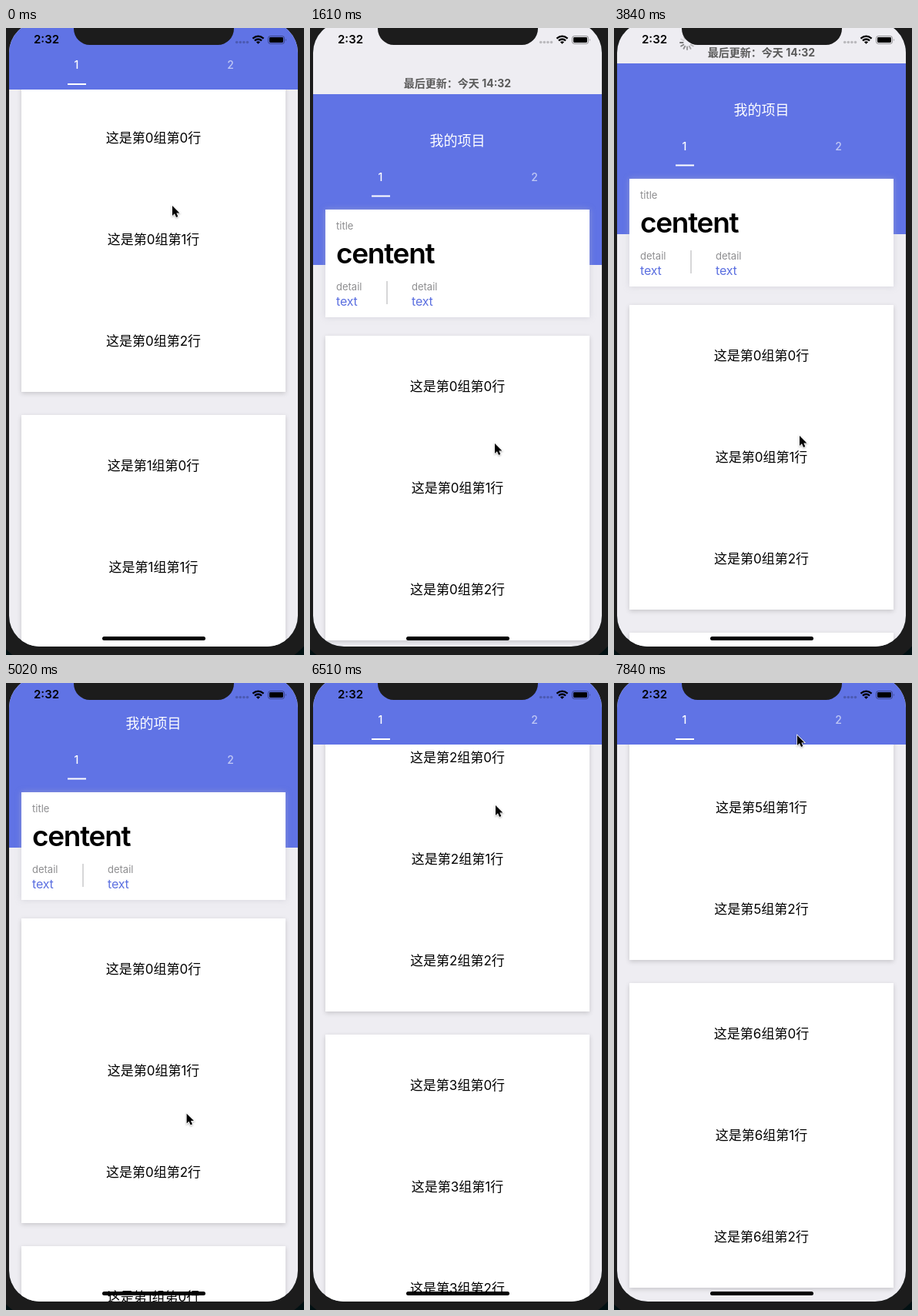
Recreate the animation shown at these times as an HTML page. Size 387x815 px, loop 7990 ms.

```html
<!DOCTYPE html>
<html lang="zh">
<head>
<meta charset="utf-8">
<title>Pull to refresh</title>
<style>
  html, body { margin: 0; width: 100%; height: 100%; overflow: hidden; background: #021113; }
  body { position: relative; font-family: Inter, "Noto Sans CJK SC", "Noto Sans CJK", sans-serif; }
  div, svg { position: absolute; }
  div { white-space: nowrap; }
  #screen {
    left: 4px; top: -8px; width: 375px; height: 812px; overflow: hidden;
    border-radius: 40px; background: #eeedf2;
  }
  #bezel {
    left: 4px; top: -8px; width: 375px; height: 812px;
    border-radius: 40px; box-shadow: 0 0 0 22px #1c1c1c;
  }
  #content { left: 0; top: 0; width: 375px; }
  .center { left: 0; width: 375px; text-align: center; }
  .hero { left: 0; top: 0; width: 375px; height: 222px; background: #6073e5; }
  .heading { top: 46px; line-height: 30px; font-size: 18px; color: #fff; }
  .updated { top: -29px; line-height: 30px; font-size: 14px; font-weight: 700; color: #5a5a5a; }
  .card {
    left: 16px; width: 343px; background: #fff;
    box-shadow: 0 2px 6px rgba(0, 0, 0, .17);
  }
  .summary { top: 150px; height: 140px; box-shadow: 0 0 7px rgba(185, 185, 195, .5); }
  .label { font-size: 13px; line-height: 20px; color: #8e8e90; }
  .value { font-size: 16px; line-height: 20px; letter-spacing: -.2px; color: #5b6fe0; }
  .big { left: 14px; top: 37px; line-height: 40px; font-size: 37px; font-weight: 600; letter-spacing: -1.3px; }
  .rule { left: 79px; top: 93px; width: 2px; height: 30px; background: #d6d6d8; }
  .group { height: 396px; }
  .row { left: 0; width: 343px; line-height: 132px; font-size: 17px; text-align: center; color: #000; }
  #tabs { left: 0; top: -56px; width: 375px; height: 88px; color: #fff; }
  .tab { top: 41px; width: 40px; line-height: 30px; font-size: 14px; font-weight: 500; text-align: center; }
  .bar { left: 76px; top: 80px; width: 24px; height: 2px; background: #fff; }
  .clock { left: 32px; top: 8px; line-height: 30px; font-size: 15px; font-weight: 600; color: #000; }
  .home { left: 121px; top: 799px; width: 134px; height: 5px; border-radius: 3px; background: #000; }
</style>
</head>
<body>
<div id="bezel"></div>
<div id="screen">
  <div id="content">
    <div class="center updated">最后更新：今天 14:32</div>
    <svg id="spinner" style="left:81px;top:-37px" width="20" height="20" viewBox="-10 -10 20 20"></svg>
    <div class="hero"></div>
    <div class="center heading">我的项目</div>
    <div class="card summary">
      <div class="label" style="left:14px;top:11px">title</div>
      <div class="big">centent</div>
      <div class="label" style="left:14px;top:90px">detail</div>
      <div class="value" style="left:14px;top:109px">text</div>
      <div class="rule"></div>
      <div class="label" style="left:112px;top:90px">detail</div>
      <div class="value" style="left:112px;top:109px">text</div>
    </div>
  </div>
  <div id="tabs">
    <div class="tab" style="left:67.5px">1</div>
    <div class="tab" style="left:267.5px;opacity:.6">2</div>
    <div class="bar"></div>
  </div>
  <div class="clock">2:32</div>
  <svg width="375" height="40" style="left:0;top:0">
    <path fill="#1c1c1c" d="M78 0Q84 0 84 6V9A21 21 0 0 0 105 30H271A21 21 0 0 0 292 9V6Q292 0 298 0Z"/>
    <g fill="#000" fill-opacity=".22">
      <circle cx="295.7" cy="26.5" r="1.8"/><circle cx="300.3" cy="26.5" r="1.8"/>
      <circle cx="304.9" cy="26.5" r="1.8"/><circle cx="309.5" cy="26.5" r="1.8"/>
    </g>
    <g fill="none" stroke="#000" stroke-width="2.2">
      <path d="M316.4 21.6Q323.5 15.6 330.6 21.6"/>
      <path d="M318.9 24.4Q323.5 20.6 328.1 24.4"/>
    </g>
    <path d="M323.5 28.8L320.9 26.3Q323.5 24.3 326.1 26.3Z"/>
    <rect x="336.5" y="18.5" width="21" height="10" rx="2.8" fill="none" stroke="#000" stroke-opacity=".4"/>
    <rect x="338" y="20" width="18" height="7" rx="1.4"/>
    <path d="M359 21.7Q360.6 23.5 359 25.3Z" fill-opacity=".45"/>
  </svg>
  <div class="home"></div>
</div>
<svg id="cursor" width="16" height="22" viewBox="-2 -2 16 22" style="left:-2px;top:-2px;filter:drop-shadow(0 1px 1px rgba(0,0,0,.3))">
  <path transform="scale(.92)" d="M0 0V14L3.2 11.1L5.5 16.2L8 15.1L5.8 10.2H10.2Z" stroke="#fff" stroke-width="1.6" paint-order="stroke"/>
</svg>
<script>
const LOOP = 7990, FIRST_PART = 2482, FLING = 44, LAST = 53;

// [step, scroll offset]; zero is the resting position
const scrollKeys = [
  [0, -229], [1, -220], [2, -192], [3, -142], [4, -84], [5, -40], [6, -10], [7, 5],
  [8, 26], [9, 50], [10, 76], [11, 94], [12, 103], [13, 78], [14, 55.5], [15, 54],
  [31, 54], [32, 42], [33, 12], [34, 0], [39, 0], [40, -82], [41, -292], [42, -562],
  [43, -852], [FLING, -1127]
];
// [step, x, y] of the pointer tip
const cursorKeys = [
  [0, 216, 231], [4, 214, 300], [7, 214, 325], [8, 216, 370], [9, 220, 430],
  [11, 240, 540], [12, 254, 584], [14, 262, 580], [16, 262, 580], [23, 247, 537],
  [26, 241, 530], [31, 241, 530], [39, 224, 609], [40, 225, 535], [41, 229, 400],
  [43, 239, 185], [FLING, 241, 159], [LAST, 238, 68]
];

const $ = id => document.getElementById(id);
const content = $('content'), tabs = $('tabs'), spinner = $('spinner'), cursor = $('cursor');

for (let g = 0; g < 7; g++) {
  const group = document.createElement('div');
  group.className = 'card group';
  group.style.top = 314 + g * 426 + 'px';
  for (let r = 0; r < 3; r++) {
    const row = document.createElement('div');
    row.className = 'row';
    row.style.top = r * 132 + 'px';
    row.textContent = `这是第${g}组第${r}行`;
    group.append(row);
  }
  content.append(group);
}

spinner.innerHTML = Array.from({ length: 12 }, (_, i) =>
  `<path d="M0 -5.5V-9" stroke="#777" stroke-width="2" stroke-linecap="round"
    opacity="${0.25 + 0.75 * Math.max(0, i - 4) / 7}" transform="rotate(${i * 30})"/>`).join('');

function sample(keys, step, column) {
  const next = keys.findIndex(key => key[0] >= step);
  if (next <= 0) return keys[0][column];
  const a = keys[next - 1], b = keys[next];
  return a[column] + (b[column] - a[column]) * (step - a[0]) / (b[0] - a[0]);
}

function stepAt(time) {
  return time < FIRST_PART
    ? Math.min(15, Math.floor(time / 146))
    : Math.min(LAST, 17 + Math.floor((time - FIRST_PART) / 148.8));
}

function scrollAt(step) {
  if (step <= FLING) return sample(scrollKeys, step, 1);
  const elapsed = (step - FLING) * 148.8;
  return Math.round(-1127 - 1444 * (1 - Math.exp(-elapsed / 500)));
}

function draw(now) {
  const step = stepAt(now % LOOP), scroll = scrollAt(step);
  content.style.transform = `translateY(${scroll}px)`;
  tabs.style.transform = `translateY(${Math.max(scroll + 107.5, 56)}px)`;
  tabs.style.background = scroll < -51.5 ? '#6073e5' : 'none';
  spinner.style.visibility = step >= 13 && step < 32 ? 'visible' : 'hidden';
  spinner.style.transform = `rotate(${30 * Math.floor(step * 1.78)}deg)`;
  cursor.style.transform =
    `translate(${sample(cursorKeys, step, 1)}px, ${sample(cursorKeys, step, 2)}px)`;
}

const start = performance.now();
function tick() {
  draw(performance.now() - start);
  requestAnimationFrame(tick);
}
tick();
</script>
</body>
</html>
```
